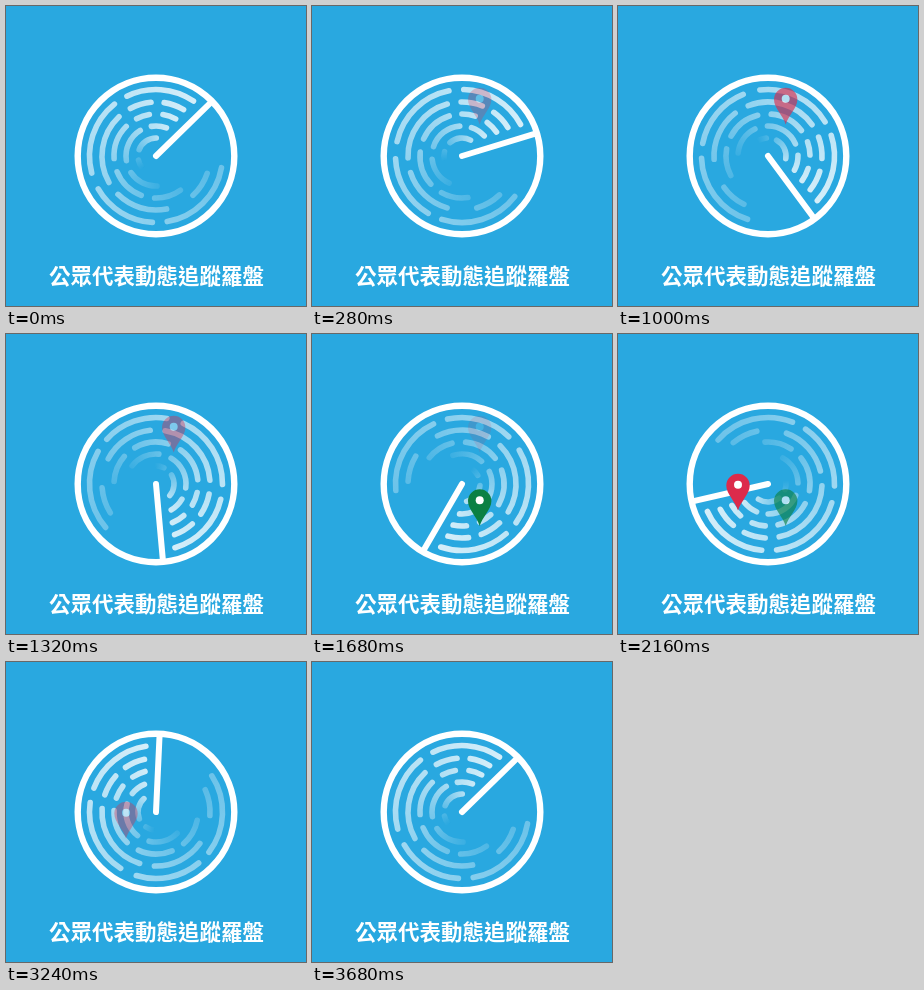
An HTML page with a canvas for the animation above (3.72 s loop, 300 by 300 pixels).

```html
<!DOCTYPE html>
<html lang="zh-Hant">
<head>
<meta charset="utf-8">
<title>Radar</title>
<style>
  html, body { margin: 0; width: 100%; height: 100%; overflow: hidden; background: #29a8e0; }
  canvas, svg { position: absolute; left: 0; top: 0; width: 300px; height: 300px; display: block; }
  text { font: 700 21.5px "Noto Sans CJK TC", "Noto Sans CJK", "Noto Sans CJK JP", sans-serif; fill: #fff; text-anchor: middle; }
</style>
</head>
<body>
<canvas id="trail"></canvas>
<svg viewBox="0 0 300 300">
  <defs>
    <path id="pin" d="M0 0C-2.5-9-11.7-16.5-11.7-25A11.7 11.7 0 0 1 11.7-25C11.7-16.5 2.5-9 0 0Z"/>
  </defs>
  <line id="hand" x1="150" y1="150" x2="150" y2="72.5" stroke="#fff" stroke-width="6" stroke-linecap="round"/>
  <circle cx="150" cy="150" r="78.3" fill="none" stroke="#fff" stroke-width="6.4"/>
  <g id="pins"></g>
  <text x="150.5" y="278.3">公眾代表動態追蹤羅盤</text>
</svg>
<script>
const LOOP = 3720, STEP = 40, TURN = 3680, START = 45.7;
const RAD = Math.PI / 180, DASH = 5.6;

// Dashes per ring: visible extent in degrees behind the hand, [from, to]
const rings = [
  { r: 66.5, dashes: [[9, 74], [82, 153], [163, 225], [233, 308]] },
  { r: 54, dashes: [[12, 40], [48, 77], [86, 168], [178, 240], [266, 300]] },
  { r: 42, dashes: [[14, 40], [51, 77], [87, 143], [154, 209], [220, 265]] },
  { r: 30, dashes: [[20, 60], [72, 150], [164, 233]] },
  { r: 18, dashes: [[36, 124], [140, 207]] }
];

// Times: appear, fully shown, start fading, gone
const pins = [
  { x: 167.7, y: 118.5, color: '#dc2b4b', times: [240, 400, 520, 1840] },
  { x: 167.7, y: 192, color: '#0b8043', times: [1340, 1500, 1700, 2950] },
  { x: 120, y: 176.5, color: '#dc2b4b', times: [1960, 2120, 2540, 3640] }
];

const hand = document.getElementById('hand');
const canvas = document.getElementById('trail');
const scale = window.devicePixelRatio || 1;
canvas.width = canvas.height = 300 * scale;
const ctx = canvas.getContext('2d');

const clamp = v => Math.max(0, Math.min(1, v));

// Inner rings fade out sooner than outer ones
function makeFade(r) {
  const reach = 60 + 6.6 * r;
  const fade = ctx.createConicGradient(0, 0, 0);
  for (const back of [360, Math.min(reach, 359), 0]) {
    fade.addColorStop(1 - back / 360, `rgba(255,255,255,${0.82 * clamp(1 - back / reach)})`);
  }
  return fade;
}

function make(tag, attrs, parent) {
  const el = document.createElementNS('http://www.w3.org/2000/svg', tag);
  for (const key in attrs) el.setAttribute(key, attrs[key]);
  return parent.appendChild(el);
}

for (const ring of rings) ring.fade = makeFade(ring.r);

for (const p of pins) {
  p.el = make('g', { transform: `translate(${p.x} ${p.y})` }, document.getElementById('pins'));
  make('use', { href: '#pin', fill: p.color }, p.el);
  make('circle', { cy: -25.7, r: 4, fill: '#fff' }, p.el);
}

function drawTrail(angle) {
  ctx.setTransform(scale, 0, 0, scale, 0, 0);
  ctx.clearRect(0, 0, 300, 300);
  ctx.translate(150, 150);
  ctx.rotate((angle - 90) * RAD);
  ctx.lineWidth = DASH;
  ctx.lineCap = 'round';
  for (const { r, dashes, fade } of rings) {
    const cap = DASH / 2 / r;
    ctx.strokeStyle = fade;
    for (const [from, to] of dashes) {
      ctx.beginPath();
      ctx.arc(0, 0, r, -to * RAD + cap, -from * RAD - cap);
      ctx.stroke();
    }
  }
}

function render(ms) {
  const t = Math.floor((ms % LOOP) / STEP) * STEP;
  const angle = START + 360 * t / TURN;
  drawTrail(angle);
  hand.setAttribute('transform', `rotate(${angle} 150 150)`);
  for (const { el, times: [a, b, c, d] } of pins) {
    el.setAttribute('opacity', Math.min(clamp((t - a) / (b - a)), clamp((d - t) / (d - c))));
  }
}

let origin;
function tick(now) {
  if (origin === undefined) origin = now;
  render(Math.max(0, now - origin));
  requestAnimationFrame(tick);
}
render(0);
requestAnimationFrame(tick);
</script>
</body>
</html>
```
